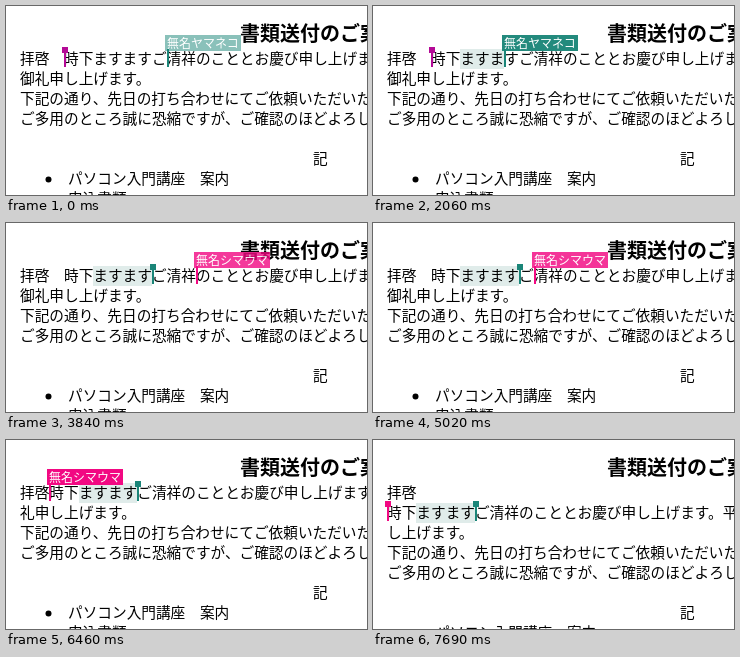
Recreate the animation shown at these times as an HTML page. Size 361 by 189 pixels, loop 8000 ms.

```html
<!DOCTYPE html>
<html lang="ja">
<head>
<meta charset="utf-8">
<title>共同編集</title>
<style>
  html, body { margin: 0; width: 100%; height: 100%; overflow: hidden; background: #fff; }
  svg { display: block; font: 350 14.667px "Noto Sans CJK JP", "Noto Sans CJK", sans-serif; fill: #000; text-spacing-trim: space-all; }
  svg * { animation-duration: 8s; animation-timing-function: step-end; animation-iteration-count: infinite; }
  .title { font-size: 20px; font-weight: bold; }
  .name { font-size: 12px; fill: #fff; }

  /* Document text: the space is deleted, then a line break is typed */
  .spaced { animation-name: spaced; }
  .joined { animation-name: joined; }
  .broken { animation-name: broken; }
  .rest { animation-name: rest; }
  @keyframes spaced { 0% { opacity: 1 } 80.75% { opacity: 0 } }
  @keyframes joined { 0% { opacity: 0 } 80.75% { opacity: 1 } 85.5% { opacity: 0 } }
  @keyframes broken { 0% { opacity: 0 } 85.5% { opacity: 1 } }
  @keyframes rest { 0% { transform: translate(0, 0) } 85.5% { transform: translate(0, 20px) } }

  .selection { fill: #e0ecea; animation-name: selection; }
  @keyframes selection {
    0% { transform: translate(87px, 43px); width: 0 }
    18% { transform: translate(87px, 43px); width: 44px }
    32.375% { transform: translate(87px, 43px); width: 59px }
    80.75% { transform: translate(73px, 43px); width: 58px }
    85.5% { transform: translate(43px, 63px); width: 59px }
  }

  /* Teal collaborator */
  .teal { fill: #1a8578; animation-name: teal-move; }
  .teal .flag { animation-name: teal-flag; }
  .teal .label { animation-name: teal-label; }
  @keyframes teal-move {
    0% { transform: translate(161px, 41px) }
    18% { transform: translate(131px, 41px) }
    32.375% { transform: translate(146px, 41px) }
    80.75% { transform: translate(131px, 41px) }
    85.5% { transform: translate(102px, 61px) }
  }
  @keyframes teal-flag {
    0%, 18%, 32.375% { opacity: 0 }
    9.125%, 27.125%, 41.625% { opacity: 1 }
  }
  @keyframes teal-label {
    0%, 18%, 32.375% { opacity: .51 }
    .5%, 18.375%, 32.875% { opacity: 1 }
    8.25%, 40.75% { opacity: .7 }
    8.625%, 41.25% { opacity: .3 }
    25.75% { opacity: .96 }
    26.125% { opacity: .6 }
    26.625% { opacity: .2 }
    9.125%, 27.125%, 41.625% { opacity: 0 }
  }

  /* Pink collaborator */
  .pink { animation-name: pink-move, pink-color; }
  .pink .flag { animation-name: pink-flag; }
  .pink .label { animation-name: pink-label; }
  @keyframes pink-color { 0% { fill: #b40a96 } 48% { fill: #f20882 } }
  @keyframes pink-move {
    0%, 74% { transform: translate(58px, 41px) }
    48% { transform: translate(190px, 41px) }
    54.375% { transform: translate(161px, 41px) }
    68% { transform: translate(146px, 61px) }
    80.75% { transform: translate(43px, 41px) }
    87% { transform: translate(14px, 61px) }
  }
  @keyframes pink-flag {
    0%, 83.125%, 96.125% { opacity: 1 }
    48%, 87% { opacity: 0 }
  }
  @keyframes pink-label {
    0%, 83.125%, 96.125% { opacity: 0 }
    48% { opacity: .8 }
    87% { opacity: .5 }
    48.5%, 64.125%, 87.5% { opacity: 1 }
    62.75%, 81.75%, 94.75% { opacity: .82 }
    63.25%, 82.125%, 95.25% { opacity: .5 }
    63.625%, 82.625%, 95.625% { opacity: .2 }
  }
</style>
</head>
<body>
<svg width="361" height="189" viewBox="0 0 361 189">
  <rect class="selection" width="0" height="20"/>

  <text class="title" x="234" y="34.5">書類送付のご案内</text>
  <g class="spaced">
    <text x="14" y="57.5">拝啓　時下ますますご清祥のこととお慶び申し上げます。</text>
    <text x="14" y="77.5">御礼申し上げます。</text>
  </g>
  <g class="joined">
    <text x="14" y="57.5">拝啓時下ますますご清祥のこととお慶び申し上げます。</text>
    <text x="14" y="77.5">礼申し上げます。</text>
  </g>
  <g class="broken">
    <text x="14" y="57.5">拝啓</text>
    <text x="14" y="77.5">時下ますますご清祥のこととお慶び申し上げます。平素</text>
    <text x="14" y="97.5">し上げます。</text>
  </g>
  <g class="rest">
    <text x="14" y="97.5">下記の通り、先日の打ち合わせにてご依頼いただいた</text>
    <text x="14" y="117.5">ご多用のところ誠に恐縮ですが、ご確認のほどよろしく</text>
    <text x="307" y="157.5">記</text>
    <circle cx="42.5" cy="173.5" r="3"/>
    <text x="62" y="177.5">パソコン入門講座　案内</text>
    <circle cx="42.5" cy="193.5" r="3"/>
    <text x="62" y="197.5">申込書類</text>
  </g>

  <g class="teal">
    <rect y="2" width="2" height="18"/>
    <rect class="flag" x="-2" width="6" height="6"/>
    <g class="label">
      <rect x="-2" y="-12" width="76" height="16"/>
      <text class="name" y="0.5">無名ヤマネコ</text>
    </g>
  </g>
  <g class="pink">
    <rect y="2" width="2" height="18"/>
    <rect class="flag" x="-2" width="6" height="6"/>
    <g class="label">
      <rect x="-2" y="-12" width="76" height="16"/>
      <text class="name" y="0.5">無名シマウマ</text>
    </g>
  </g>
</svg>
</body>
</html>
```
